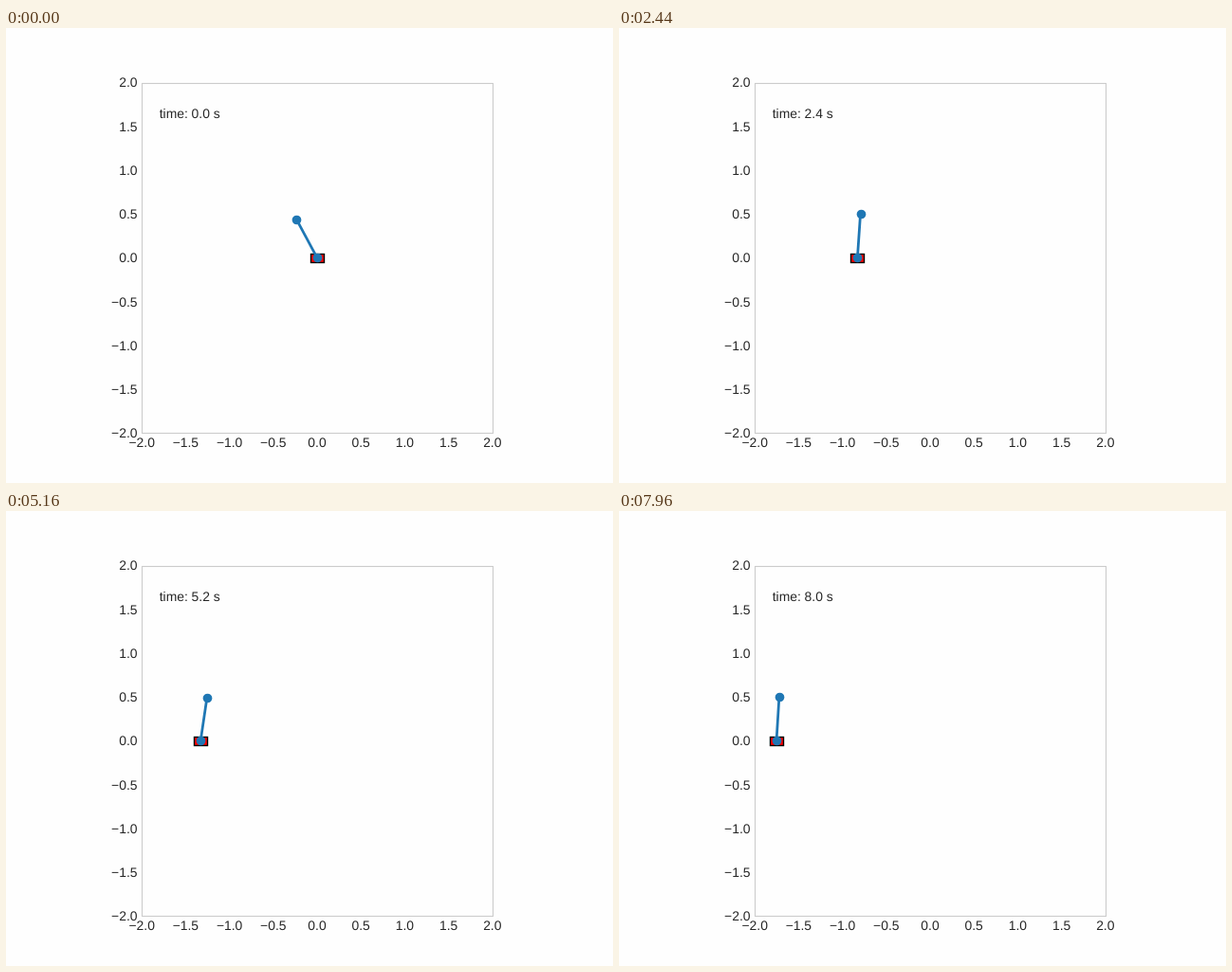
An HTML page that plays this animation: 640 px wide and 480 px high, repeating every 8 s.

```html
<!DOCTYPE html>
<html lang="en">
<head>
<meta charset="utf-8">
<title>Cart and pole</title>
<style>
  html, body { margin: 0; width: 100%; height: 100%; overflow: hidden; background: #fefefe; }
  svg { display: block; width: 640px; height: 480px; }
  text {
    font: 13.89px "Liberation Sans", Arial, sans-serif;
    fill: #262626;
    text-rendering: geometricPrecision;
  }
</style>
</head>
<body>
<svg viewBox="0 0 640 480">
  <rect x="143.5" y="58.5" width="370" height="369" fill="none" stroke="#ccc" stroke-width="1.11"/>
  <g id="ticks"></g>
  <text id="clock" x="161.7" y="95"></text>
  <rect id="cart" y="238.5" height="9" fill="#f00" stroke="#000" stroke-width="1.39"/>
  <g fill="#1f77b4">
    <line id="pole" stroke="#1f77b4" stroke-width="2.78" stroke-linecap="round"/>
    <circle id="pivot" r="4.86"/>
    <circle id="bob" r="4.86"/>
  </g>
</svg>
<script>
const LOOP = 8000, STEP = 40;
const CX = 328, CY = 242.4, UNIT = 92.4, LEN = UNIT / 2;
const $ = id => document.getElementById(id);
const set = (el, attrs) => { for (const k in attrs) el.setAttribute(k, attrs[k]); };
const snap = v => Math.floor(v + 0.5) + 0.5;

function label(x, y, anchor, value) {
  const el = document.createElementNS("http://www.w3.org/2000/svg", "text");
  set(el, { x, y, "text-anchor": anchor });
  el.textContent = value.toFixed(1).replace("-", "\u2212");
  $("ticks").append(el);
}
for (let v = -2; v <= 2; v += 0.5) {
  label(CX + v * UNIT, 442, "middle", v);
  label(138.5, Math.round(CY - v * UNIT + 4.9), "end", v);
}

// Smooth curve through [x, y] points (cubic Hermite).
function curve(pts) {
  const last = pts.length - 1;
  const slope = i => {
    const a = pts[Math.max(i - 1, 0)], b = pts[Math.min(i + 1, last)];
    return (b[1] - a[1]) / (b[0] - a[0]);
  };
  return x => {
    let i = 0;
    while (i < last - 1 && x > pts[i + 1][0]) i++;
    const [x0, y0] = pts[i], [x1, y1] = pts[i + 1];
    const h = x1 - x0, u = (x - x0) / h, w = 1 - u;
    return w * w * ((1 + 2 * u) * y0 + u * h * slope(i)) +
           u * u * ((3 - 2 * u) * y1 - w * h * slope(i + 1));
  };
}

// Swings completed and swing width of the cart (px) over time (s).
const swings = curve([[0, 0], [0.8, 1], [1.04, 1.36], [2.44, 3.71], [3.6, 6],
                      [5.17, 9.5], [6.305, 12], [7.885, 15.5], [8, 15.755]]);
const width = curve([[0, 28.8], [0.84, 23.9], [2.03, 16], [3.6, 10.6],
                     [5.17, 7.5], [6.3, 6.6], [8, 6.2]]);

function draw(t) {
  const drift = 292.7 - 15.52 * t + 6.5 * Math.exp(-t / 0.6);
  const sway = width(t) * Math.cos(2 * Math.PI * swings(t));
  const lag = 4.65 + 10 * Math.exp(-t / 1.15);
  const sin = -sway / (LEN + lag);
  const x = drift + sway;
  const bx = x + LEN * sin, by = CY - LEN * Math.sqrt(1 - sin * sin);
  const left = snap(x - 6.93);

  set($("cart"), { x: left, width: snap(x + 6.93) - left });
  set($("pole"), { x1: x, y1: CY, x2: bx, y2: by });
  set($("pivot"), { cx: snap(x), cy: snap(CY) });
  set($("bob"), { cx: snap(bx), cy: snap(by) });
  $("clock").textContent = `time: ${t.toFixed(1)} s`;
}

const start = performance.now();
function tick(now) {
  const ms = Math.max(0, now - start) % LOOP;
  draw(Math.floor(ms / STEP) * STEP / 1000);
  requestAnimationFrame(tick);
}
draw(0);
requestAnimationFrame(tick);
</script>
</body>
</html>
```
